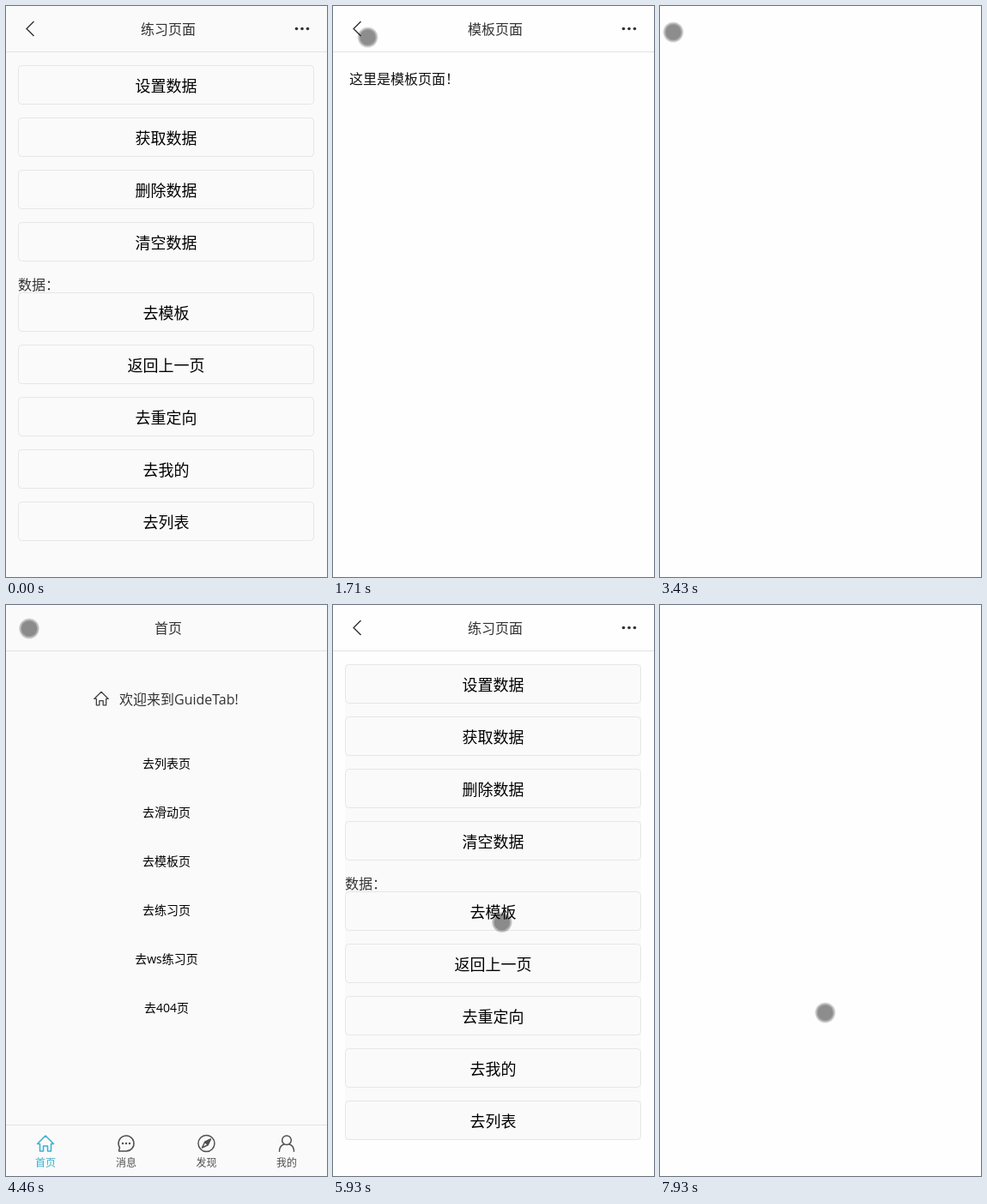
An HTML page that plays this animation: 374x666 px, repeating every 8 s.

```html
<!DOCTYPE html>
<html lang="zh-CN">
<head>
<meta charset="utf-8">
<title>练习页面</title>
<style>
html, body { margin: 0; width: 100%; height: 100%; overflow: hidden; background: #fefefe; }
svg { display: block; }
text { font: 16px "Open Sans", "Noto Sans CJK SC", "Noto Sans CJK", sans-serif; fill: #333; }
.mid { text-anchor: middle; }
.rule { stroke: #e2e2e2; }
.icon { fill: none; stroke: currentColor; stroke-width: 1.5; stroke-linecap: round; stroke-linejoin: round; }
#buttons rect { fill: none; stroke: #e6e6e6; }
#buttons text { font-size: 18px; fill: #000; }
#links text { font-size: 14px; fill: #000; }
#tabs text { font-size: 12px; fill: currentColor; }

/* Pages switch hard; every track shares one 8 s clock. */
.track { animation: 8s step-end infinite; }
#stage { animation-name: stage; }
#bar { animation-name: bar; }
#nav { animation-name: nav; }
#heading { animation-name: heading; }
#practice { animation-name: practice; }
#template { animation-name: template; }
#home { animation-name: home; }
#touch { animation: touch 8s linear infinite, appear 8s step-end infinite; }

@keyframes stage {
  0%, 26.375%, 55.75% { fill: #fafafa; }
  13.5%, 36.625%, 72%, 100% { fill: #fefefe; }
}
@keyframes bar {
  0%, 46.25% { opacity: 1; }
  36.625%, 99.125%, 100% { opacity: 0; }
}
@keyframes nav {
  0%, 46.25%, 72% { opacity: 1; }
  36.625%, 55.75%, 99.125%, 100% { opacity: 0; }
}
@keyframes heading {
  0%, 26.375%, 46.25%, 72% { opacity: 1; }
  13.5%, 36.625%, 55.75%, 99.125%, 100% { opacity: 0; }
}
@keyframes practice {
  0%, 26.375%, 47%, 73.5% { opacity: 1; }
  13.5%, 36.625%, 55.75%, 99.125%, 100% { opacity: 0; }
}
@keyframes template {
  0%, 26.375%, 100% { opacity: 0; }
  13.5% { opacity: 1; }
}
@keyframes home {
  0%, 72%, 100% { opacity: 0; }
  55.75% { opacity: 1; }
}
@keyframes appear {
  0% { opacity: 0; }
  6.25%, 100% { opacity: 1; }
}
@keyframes touch {
  0%, 6.25% { transform: translate(44px, 376px); }
  8.5% { transform: translate(150px, 366px); }
  10.75%, 14.25% { transform: translate(220px, 362px); }
  17.5% { transform: translate(120px, 205px); }
  20.25% { transform: translate(42px, 60px); }
  21.375%, 22% { transform: translate(40.5px, 36.5px); }
  22.875% { transform: translate(39.5px, 29.5px); }
  24.375%, 27.5% { transform: translate(32px, 27px); }
  29.5% { transform: translate(85px, 150px); }
  31.875% { transform: translate(158px, 322px); }
  33.5% { transform: translate(178px, 395px); }
  34.625%, 37.5% { transform: translate(194.5px, 419px); }
  40% { transform: translate(95px, 205px); }
  42% { transform: translate(25px, 55px); }
  42.875%, 43.6% { transform: translate(15.5px, 30.5px); }
  46.25% { transform: translate(14px, 22px); }
  47.5% { transform: translate(24px, 20px); }
  49.75%, 56.5% { transform: translate(27px, 27.5px); }
  58% { transform: translate(50px, 83px); }
  59.5% { transform: translate(76px, 137px); }
  61% { transform: translate(110px, 221px); }
  62.5% { transform: translate(142px, 300px); }
  64.875%, 66.5% { transform: translate(187.5px, 399.5px); }
  67.875%, 73% { transform: translate(197.5px, 367.5px); }
  81.875%, 82.5% { transform: translate(192.5px, 387.5px); }
  90%, 95.3% { transform: translate(192.5px, 474.5px); }
  95.375%, 100% { transform: translate(192.5px, 475.5px); }
}
</style>
</head>
<body>
<svg width="374" height="666" viewBox="0 0 374 666">
  <defs>
    <path id="house" class="icon" d="M-9.5 .5 0 -9 9.5 .5H6.5V9H2.5V3H-2.5V9H-6.5V.5Z"/>
  </defs>
  <rect id="stage" class="track" width="374" height="666"/>

  <path id="bar" class="track rule" d="M0 53.5H374"/>
  <g id="nav" class="track">
    <path d="M32.5 18 24 26.5 32.5 35" fill="none" stroke="#333" stroke-width="1.4"/>
    <g fill="#333">
      <circle cx="338.5" cy="26.5" r="1.8"/>
      <circle cx="345" cy="26.5" r="1.8"/>
      <circle cx="351.5" cy="26.5" r="1.8"/>
    </g>
  </g>
  <text id="heading" class="track mid" x="189" y="33">练习页面</text>

  <g id="practice" class="track">
    <rect x="14" y="69" width="345" height="555" fill="#fafafa"/>
    <g id="buttons"></g>
    <text x="14" y="331">数据：</text>
  </g>

  <g id="template" class="track">
    <text class="mid" x="189" y="33">模板页面</text>
    <text x="19" y="91" style="fill:#111">这里是模板页面！</text>
  </g>

  <g id="home" class="track">
    <text class="mid" x="189" y="33">首页</text>
    <use href="#house" transform="translate(111 109) scale(.87)" color="#444"/>
    <text x="132" y="116">欢迎来到GuideTab!</text>
    <g id="links"></g>
    <path class="rule" d="M0 606.5H374"/>
    <g id="tabs" color="#505050">
      <g transform="translate(46 628)" color="#3bb1d0">
        <use href="#house"/>
        <text class="mid" y="27">首页</text>
      </g>
      <g transform="translate(140 628)">
        <path class="icon" d="M-8.5 9H0A9 9 0 1 0 -7.6 4.8Z"/>
        <g fill="currentColor">
          <circle cx="-4" r="1.2"/>
          <circle r="1.2"/>
          <circle cx="4" r="1.2"/>
        </g>
        <text class="mid" y="27">消息</text>
      </g>
      <g transform="translate(233.5 628)">
        <circle class="icon" r="9.5"/>
        <path class="icon" d="M5 -5 1.8 1.8 -5 5 -1.8 -1.8ZM-1.8 -1.8 1.8 1.8"/>
        <path d="M5 -5 1.8 1.8 -1.8 -1.8Z" fill="currentColor"/>
        <text class="mid" y="27">发现</text>
      </g>
      <g transform="translate(327 628)">
        <circle class="icon" cy="-3.7" r="5.3"/>
        <path class="icon" d="M-8.5 9.3C-8.5 4.5 -6 2 -3 1M8.5 9.3C8.5 4.5 6 2 3 1"/>
        <text class="mid" y="27">我的</text>
      </g>
    </g>
  </g>

  <g id="touch">
    <circle r="11.5" fill="#000" fill-opacity=".25"/>
    <circle r="9.5" fill="#000" fill-opacity=".26"/>
  </g>
</svg>
<script>
const byId = id => document.getElementById(id);
const label = (x, y, text) => `<text class="mid" x="${x}" y="${y}">${text}</text>`;

const actions = ["设置数据", "获取数据", "删除数据", "清空数据", "去模板", "返回上一页", "去重定向", "去我的", "去列表"];
byId("buttons").innerHTML = actions.map((text, i) => {
  const y = 69 + 61 * i + (i > 3 ? 21 : 0);
  return `<rect x="14.5" y="${y + 0.5}" width="344" height="45" rx="4"/>` + label(186.5, y + 31, text);
}).join("");

const links = ["去列表页", "去滑动页", "去模板页", "去练习页", "去ws练习页", "去404页"];
byId("links").innerHTML = links.map((text, i) => label(187, 190 + 57 * i, text)).join("");
</script>
</body>
</html>
```
